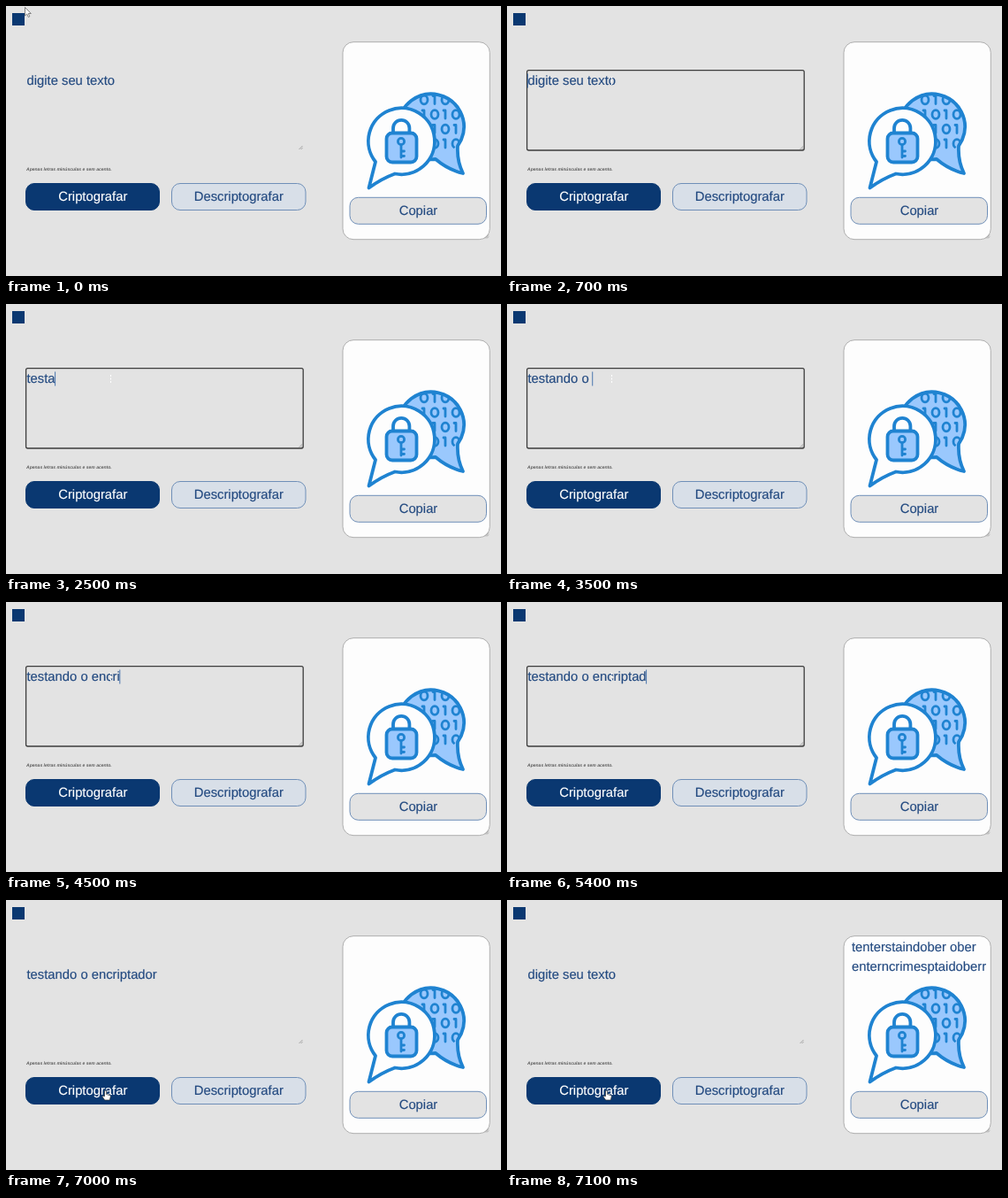
Write an HTML page that moves like this. It is 560 px wide and 305 px high and loops after 8 s.

```html
<!DOCTYPE html>
<html lang="pt">
<head>
<meta charset="utf-8">
<style>
  html, body { margin: 0; width: 100%; height: 100%; overflow: hidden; background: #e3e3e3; }
  svg { display: block; width: 560px; height: 305px; }
  text { font: 14.8px "Liberation Sans", Arial, sans-serif; fill: #234a80; stroke: #234a80; stroke-width: .15; text-rendering: geometricPrecision; white-space: pre; }
  .mid { text-anchor: middle; }
  .light { fill: #fff; stroke: #fff; }
  .note { font: italic bold 5.04px "Liberation Sans", Arial, sans-serif; fill: #5a5a5a; stroke: none; }
  .line { fill: none; stroke: #1f83d1; stroke-width: 3.8; stroke-linejoin: round; stroke-linecap: round; }
  .thin { stroke-width: 2.8; }
  .sky { fill: #9ac8fd; }
  .edge { stroke: #6f8fb8; stroke-width: 1; }
  .grip { stroke: #888; stroke-width: .7; }
</style>
</head>
<body>
<svg viewBox="0 0 560 305">
  <defs>
    <clipPath id="disc"><circle cx="481" cy="136" r="36"/></clipPath>
  </defs>
  <rect x="7" y="8" width="14" height="14" fill="#0a3871"/>

  <rect id="focus" x="22.6" y="72.6" width="313.6" height="90.4" rx="2" fill="none" stroke="#3c3c3c" stroke-width="1.3"/>
  <path class="grip" d="M331.5 162l4-4M333.7 162l1.8-1.8"/>
  <text id="field" x="23.5" y="89.4"></text>
  <path id="squiggle" fill="none" stroke="#e0484c" stroke-width=".9"/>
  <rect id="caret" y="76.5" width="1" height="16" fill="#4a76ae"/>
  <text class="note" x="23" y="186">Apenas letras minúsculas e sem acento.</text>

  <rect x="22.5" y="200.5" width="151" height="30" rx="9.5" fill="#0a3871" stroke="#0a3871"/>
  <text class="mid light" x="98.3" y="220.3">Criptografar</text>
  <rect class="edge" x="187.5" y="200.5" width="151.5" height="30" rx="9.5" fill="#d8dfe8"/>
  <text class="mid" x="263.3" y="220.3">Descriptografar</text>

  <rect x="381" y="40.7" width="166.3" height="223" rx="12" fill="#fdfdfd" stroke="#a6a6a6" stroke-width=".9"/>
  <path class="grip" d="M542 262.5l4-4M544 262.5l2-2"/>
  <g id="result">
    <text x="390" y="57.5">tenterstaindober ober</text>
    <text x="390" y="79.8">enterncrimesptaidoberr</text>
  </g>

  <path class="line sky" d="M515 151A37 37 0 1 0 486 173Q500 185 517 189Q510 175 511 158Z"/>
  <g id="bits" class="line thin" clip-path="url(#disc)"></g>
  <path class="line" style="fill:#fdfdfd" d="M418 176A37.5 37.5 0 1 1 440 189.5Q425 195 410.5 205.5Q414 192 418 176Z"/>
  <path class="line" d="M438 143v-5a9.2 9.2 0 0 1 18.4 0v5"/>
  <rect class="line sky" x="430.5" y="143.5" width="34" height="33" rx="6.5"/>
  <circle class="line thin" cx="447" cy="153" r="3.6"/>
  <path class="line thin" d="M447 157v14M447 164h3.5M447 169.5h3.5"/>

  <rect class="edge" x="389" y="216.3" width="154.5" height="30" rx="9.5" fill="#e3e3e3"/>
  <text class="mid" x="466.5" y="236.4">Copiar</text>

  <path id="beam" d="M0-5V5" stroke="#fff" stroke-width="1" stroke-dasharray="2 1.5"/>
  <path id="arrow" d="M0 0V9.5L2.2 7.5 3.8 11 5.3 10.3 3.8 7H6.8Z" fill="#fff" stroke="#555" stroke-width=".7"/>
  <path id="hand" d="M-1 .8Q0-.5 1 .8V4.5L5 5.6Q6 6 5.7 7.5L4.8 11H-.8L-3.6 7Q-3.6 5.4-1 6.8Z" fill="#fff" stroke="#333" stroke-width=".7"/>
</svg>
<script>
const $ = id => document.getElementById(id);
const LOOP = 8000, X0 = 23.5;
const PHRASE = 'testando o encriptador', HINT = 'digite seu texto';
// time at which each letter of PHRASE is typed
const KEYS = [1600, 1900, 2100, 2400, 2500, 2800, 2900, 3000, 3300, 3400, 3500,
  3900, 4000, 4100, 4400, 4500, 4800, 5100, 5200, 5400, 5500, 5600];
const FOCUS = 600, BLUR = 7000, DONE = 7100;

$('squiggle').setAttribute('d', 'M97 91' + 'l1 1.6 1-1.6'.repeat(37));

// checkerboard of binary digits inside the rear bubble
for (let i = 0; i < 16; i++) {
  const col = i % 4, row = i >> 2;
  const x = 473 + col * 12, y = 106 + row * 16.5;
  $('bits').innerHTML += (col + row) % 2
    ? `<path d="M${x - 2} ${y - 4.5}h2v9"/>`
    : `<ellipse cx="${x}" cy="${y}" rx="4" ry="4.8"/>`;
}

const show = (id, on) => $(id).style.display = on ? '' : 'none';
const clamp = v => Math.max(0, Math.min(1, v));

function pointer(t) {
  const tick = Math.floor(t / 100);
  const a = clamp(tick / 4), b = clamp((tick - 60) / 7);
  const ease = b * b * (3 - 2 * b);
  const x = 21.5 + 97 * a - 6 * ease, y = 1.5 + 83.5 * a + 130 * ease;
  const kind = y > 200 ? 'hand' : y > 72 && y < 163 ? 'beam' : 'arrow';
  for (const id of ['beam', 'arrow', 'hand']) show(id, id === kind);
  $(kind).setAttribute('transform', `translate(${x} ${y})`);
}

function draw(t) {
  const n = KEYS.filter(k => k <= t).length;
  const focused = t >= 700 && t < BLUR;
  const typed = t < DONE ? PHRASE.slice(0, n) : '';
  $('field').textContent = typed || HINT;
  const last = n ? KEYS[n - 1] : FOCUS;
  $('caret').setAttribute('x', typed ? X0 + $('field').getComputedTextLength() - .5 : X0 - .5);
  show('caret', focused && Math.floor((t - last) / 500) % 2 === 0);
  show('focus', focused);
  show('squiggle', t >= 6100 && t < BLUR);
  show('result', t >= DONE);
  pointer(t);
}

const start = performance.now();
function frame() {
  draw((performance.now() - start) % LOOP);
  requestAnimationFrame(frame);
}
frame();
</script>
</body>
</html>
```
